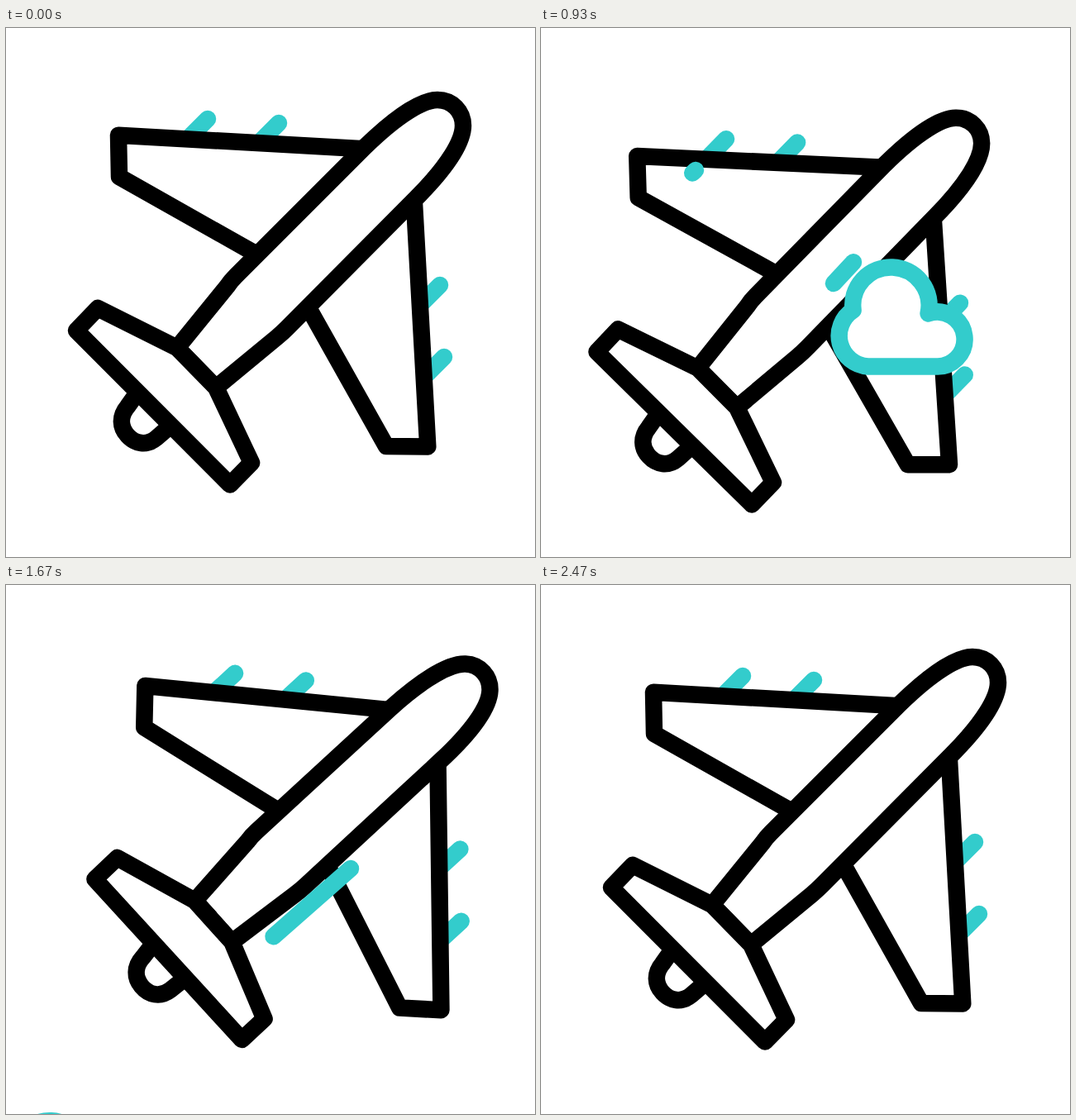
Animation, 640 px wide and 640 px high, one loop 2.5 s. Source, as an HTML page:

```html
<!DOCTYPE html>
<html lang="en">
<head>
<meta charset="utf-8">
<title>Plane</title>
<style>
  html, body { margin: 0; width: 100%; height: 100%; overflow: hidden; background: #fff; }
  svg { display: block; width: 100%; height: 100%; }
  path { stroke-width: 20.5; stroke-linecap: round; stroke-linejoin: round; stroke: #000; fill: #fff; }
  .teal { stroke: #3cc; }
</style>
</head>
<body>
<svg viewBox="0 0 640 640">
  <g id="plane">
    <path class="teal" d="M244 110l-22 22M330 115l-22 22M525 311l-22 22M530 398l-22 22"/>
    <path d="M157 444L147 458C137 470 138 483 147 493S170 506 182 496L197 483"/>
    <path d="M428 146L136 129.7L137 180L300 272M494 212L510.3 506.5L460 506L369 344"/>
    <path d="M207 387L268 312Q272 306 278 300L434 144C475 104 505 87 522 87C540 87 553 101 553 118C553 136 536 166 496 206L340 363Q334 369 328 374L254 435Z"/>
    <path d="M85 366L111 339L207 387L254 435L297 526L271 552.5Z"/>
  </g>
  <g id="streaks"></g>
  <path id="cloud" class="teal" d="M378 341A46.2 46.2 0 1 1 469 345A33 33 0 1 1 477 409H396A37 37 0 0 1 378 341Z"/>
</svg>
<script>
const LOOP = 2500, STREAK_TIME = 420;
const $ = id => document.getElementById(id);
const clamp = u => Math.min(1, Math.max(0, u));
const smooth = u => (u = clamp(u), u * u * (3 - 2 * u));

// Steeper ease: cubic-bezier(.45, 0, .55, 1)
function steep(u) {
  let lo = 0, hi = 1;
  for (let i = 0; i < 20; i++) {
    const s = (lo + hi) / 2, r = 1 - s;
    if (1.35 * s * r * r + 1.65 * s * s * r + s * s * s < u) lo = s; else hi = s;
  }
  return smooth(lo);
}

// Eased value at time t between [time, value] keys
function track(keys, t) {
  const i = keys.findIndex(key => key[0] > t);
  if (i < 0) return keys[keys.length - 1][1];
  const [t0, a] = keys[i - 1], [t1, b] = keys[i];
  return a + (b - a) * smooth((t - t0) / (t1 - t0));
}

const planeX = [[0, 0], [365, 0], [1205, -24], [1730, 26], [2230, 0]];
const planeY = [[0, 0], [615, 43.8], [1280, 0]];
const planeTurn = [[0, 0], [640, -3.85], [1250, 3.28], [2500, 0]];

const streaks = [
  { from: [319, 174], to: [157, 314], head: 30, tail: 325 },
  { from: [450, 206], to: [354, 309], head: 320, tail: 648 },
  { from: [187, 172], to: [94, 257], head: 880, tail: 1208 },
  { from: [417, 343], to: [300, 446], head: 1372, tail: 1730 }
];
for (const streak of streaks) {
  streak.el = document.createElementNS($("cloud").namespaceURI, "path");
  streak.el.setAttribute("class", "teal");
  $("streaks").append(streak.el);
}

function drawStreak({ el, from, to, head, tail }, t) {
  const point = start => {
    const s = smooth((t - start) / STREAK_TIME);
    return from.map((v, i) => v + (to[i] - v) * s);
  };
  const visible = t > head && t < tail + STREAK_TIME;
  el.setAttribute("d", visible ? `M${point(tail)}L${point(head)}` : "");
}

function draw() {
  const t = performance.now() % LOOP;
  $("plane").setAttribute("transform",
    `translate(${track(planeX, t)} ${track(planeY, t)}) rotate(${track(planeTurn, t)} 323 318)`);
  const drift = 295 - 686 * steep(clamp((t - 100) / 1800));
  $("cloud").setAttribute("transform", `translate(${drift} ${-0.968 * drift})`);
  streaks.forEach(streak => drawStreak(streak, t));
  requestAnimationFrame(draw);
}
draw();
</script>
</body>
</html>
```
